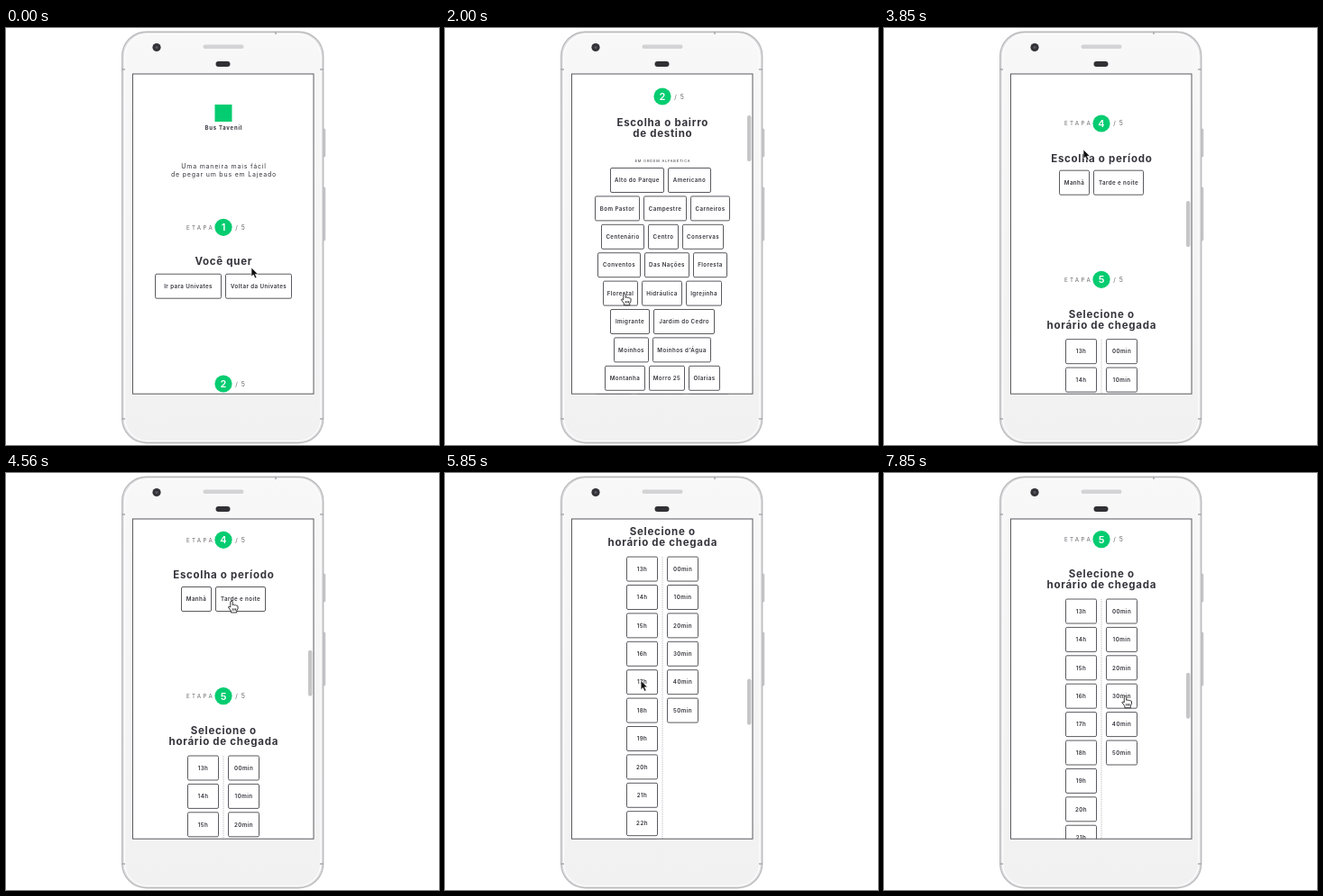
Animation, 480 px wide and 463 px high, one loop 8 s. Source, as an HTML page:

```html
<!DOCTYPE html>
<html lang="pt-BR">
<head>
<meta charset="utf-8">
<title>Ônibus em cinco etapas</title>
<style>
  html, body { margin: 0; width: 100%; height: 100%; overflow: hidden; background: #fff; }
  svg { display: block; width: 100%; height: 100%; }
  text { font-family: Inter, Roboto, sans-serif; text-anchor: middle; fill: #34343c; }
  .title { font-size: 11.5px; font-weight: 700; letter-spacing: .72px; }
  .button { font-size: 6.2px; font-weight: 600; letter-spacing: .42px; }
  .lead { font-size: 7px; letter-spacing: .8px; }
  .brand { font-size: 6px; font-weight: 700; letter-spacing: .75px; }
  .hint { font-size: 3.9px; letter-spacing: .85px; }
  .step { font-size: 6.2px; letter-spacing: 2.4px; fill: #66666c; }
  .total { font-size: 7px; letter-spacing: 1px; fill: #66666c; }
  .number { font-size: 11px; font-weight: 600; fill: #fff; }
  .result { font-size: 9.5px; font-weight: 600; letter-spacing: 1.6px; fill: #fff; }
  .box { fill: #fff; stroke: #5a5a60; stroke-width: 1; }
  .green { fill: #04cc70; }
</style>
</head>
<body>
<svg viewBox="0 0 480 463">
  <defs>
    <clipPath id="screen"><rect x="140.5" y="51.5" width="200.5" height="355"/></clipPath>
    <linearGradient id="shell" x2="0" y2="1">
      <stop stop-color="#f8f8f9"/><stop offset="1" stop-color="#f1f1f2"/>
    </linearGradient>
  </defs>

  <g fill="#c8c8cb" stroke="#aeaeb2" stroke-width=".5">
    <rect x="351" y="112" width="2.9" height="31" rx="1"/>
    <rect x="351" y="177" width="2.9" height="59" rx="1"/>
  </g>
  <rect x="128.7" y="4.2" width="223" height="456.5" rx="27" fill="#e2e2e4" stroke="#bcbcbf" stroke-width="1.4"/>
  <rect x="131.5" y="6.5" width="217.5" height="452" rx="25" fill="url(#shell)" stroke="#fff" stroke-width="1.2"/>
  <path d="M128 46h4M348 46h4M128 434h4M348 434h4M299 4v3" stroke="#aaaaae" stroke-width="1.6"/>
  <rect x="218.5" y="18.5" width="45" height="4.5" rx="2.2" fill="#d3d3d5"/>
  <circle cx="167" cy="21.5" r="4.6" fill="#333338"/>
  <circle cx="167" cy="21.5" r="1.6" fill="#56565e"/>
  <rect x="232.5" y="37" width="16" height="6" rx="3" fill="#303035"/>

  <rect x="140" y="51" width="201" height="355" fill="#fff"/>
  <g clip-path="url(#screen)">
    <g id="page"></g>
    <rect id="thumb" x="335" width="4.4" height="51" rx="2.2" fill="#c6c6c8"/>
  </g>
  <rect x="140.5" y="51" width="200.5" height="355.2" fill="none" stroke="#5b5b60"/>

  <path id="arrow" d="M0 0V10L2.3 8L4 11.8L5.9 11L4.2 7.3H7.3Z" fill="#111" stroke="#fff" stroke-width=".6"/>
  <path id="hand" d="M-1.2 1Q0-.6 1.2 1V4.8Q2.4 3.9 3.3 5Q4.5 4.2 5.3 5.4Q6.6 4.9 7 6.2V9L5.8 11V13.2H-.6V11.4L-3.6 7.2Q-3.4 5.6-1.2 7.2ZM1.2 8.6V11M3 8.6V11M4.7 8.6V11" fill="#fff" stroke="#222" stroke-width=".9" stroke-linejoin="round"/>
</svg>
<script>
const LOOP = 8000, FPS = 7, SCREEN_TOP = 51, PITCH = 31.4;
const $ = id => document.getElementById(id);
const page = $('page');

function add(tag, attrs, content = '') {
  const node = document.createElementNS('http://www.w3.org/2000/svg', tag);
  for (const name in attrs) node.setAttribute(name, attrs[name]);
  node.textContent = content;
  page.append(node);
}
const label = (style, x, y, content) => add('text', { class: style, x, y }, content);
const title = (y, ...lines) => lines.forEach((line, i) => label('title', 241.3, y + i * 12.2, line));

function step(n, y) {
  if (n !== 2) label('step', 215.5, y + 2.3, 'ETAPA');
  add('circle', { class: 'green', cx: 241, cy: y, r: 9.6 });
  label('number', 241, y + 4, n);
  label('total', 260, y + 2.5, '/ 5');
}

function button(x, y, width, content) {
  add('rect', { class: 'box', x: x + .5, y: y - 13.5, width: width - 1, height: 27, rx: 1.5 });
  label('button', x + width / 2, y + 2.2, content);
}

// Each row alternates label and width, laid out around a centre.
function row(y, items, centre = 241) {
  const gap = 4, pairs = [];
  for (let i = 0; i < items.length; i += 2) pairs.push([items[i], items[i + 1]]);
  const total = pairs.reduce((sum, [, w]) => sum + w + gap, -gap);
  let x = centre - total / 2;
  for (const [content, width] of pairs) {
    button(x, y, width, content);
    x += width + gap;
  }
}
const rows = (y, list) => list.forEach((items, i) => row(y + i * PITCH, items));

add('rect', { class: 'green', x: 231.5, y: 85, width: 19, height: 19 });
label('brand', 241.3, 113, 'Bus Tavenil');
label('lead', 241.5, 155.5, 'Uma maneira mais fácil');
label('lead', 241.5, 165.3, 'de pegar um bus em Lajeado');

step(1, 221.3);
title(263.3, 'Você quer');
row(286.7, ['Ir para Univates', 74, 'Voltar da Univates', 74]);

step(2, 395);
title(428.2, 'Escolha o bairro', 'de destino');
label('hint', 241.5, 468.3, 'EM ORDEM ALFABÉTICA');
row(488, ['Alto do Parque', 60, 'Americano', 48], 239);
rows(488 + PITCH, [
  ['Bom Pastor', 50, 'Campestre', 48, 'Carneiros', 44],
  ['Centenário', 48, 'Centro', 34, 'Conservas', 46],
  ['Conventos', 48, 'Das Nações', 50, 'Floresta', 38],
  ['Florestal', 39, 'Hidráulica', 45, 'Igrejinha', 40],
  ['Imigrante', 44, 'Jardim do Cedro', 68],
  ['Moinhos', 39, 'Moinhos d\'Água', 65],
  ['Montanha', 45, 'Morro 25', 40, 'Olarias', 35],
  ['Planalto', 41, 'Santo André', 54, 'São Bento', 46],
  ['São Cristóvão', 61, 'Universitário', 59]
]);

step(3, 878);
title(920, 'Escolha a parada');
rows(943, [
  ['Rodoviária', 46, 'Posto Verdália', 59],
  ['Banco Ondaleo', 57, 'Beer Tuk', 41, 'Suíça', 29]
]);

step(4, 1082.3);
title(1125, 'Escolha o período');
row(1148, ['Manhã', 34, 'Tarde e noite', 56]);

step(5, 1255.6);
title(1298, 'Selecione o', 'horário de chegada');
add('path', { d: 'M241 1322V1663', stroke: '#b9b9bd', 'stroke-width': 1, 'stroke-dasharray': '1 1' });
for (let i = 0; i < 11; i++) button(201, 1335.5 + i * PITCH, 35, `${13 + i}h`);
for (let i = 0; i < 6; i++) button(246, 1335.5 + i * PITCH, 35, `${i}0min`);

add('rect', { class: 'green', x: 140, y: 1748, width: 202, height: 700 });
label('result', 242, 1787.3, 'RESULTADO');

// Keys are [time, ...values].
const scrollKeys = [
  [850, 0], [1400, 319], [2030, 319], [2560, 804], [3446, 804], [4000, 1008],
  [4623, 1008], [5177, 1182], [5600, 1182], [6400, 1382.5], [6900, 1382.5], [7500, 1182]
];
const cursorKeys = [
  [0, 272, 266], [500, 277, 284], [1200, 277, 284], [1850, 199, 294.5], [2450, 199, 294.5],
  [2560, 200, 295], [3000, 207, 138], [3500, 210, 140], [3850, 221, 135], [4300, 250, 140],
  [4650, 250, 142], [5140, 235, 165], [5900, 217, 231], [7100, 217, 231], [7750, 267.5, 247.5]
];
const handSpans = [[350, 900], [1800, 2400], [2950, 3600], [4250, 4750], [5900, 6950], [7500, 8000]];

const swing = p => (1 - Math.cos(Math.PI * p)) / 2;

function sample(keys, t) {
  const next = keys.findIndex(key => key[0] > t);
  if (next === 0) return keys[0].slice(1);
  if (next < 0) return keys.at(-1).slice(1);
  const a = keys[next - 1], b = keys[next];
  const p = swing((t - a[0]) / (b[0] - a[0]));
  return a.slice(1).map((v, i) => v + (b[i + 1] - v) * p);
}

function draw(now) {
  const t = Math.floor(((now % LOOP) + 12) * FPS / 1000) * 1000 / FPS % LOOP;
  const [scroll] = sample(scrollKeys, t);
  const [x, y] = sample(cursorKeys, t);
  const isHand = handSpans.some(([from, to]) => t >= from && t < to);

  page.setAttribute('transform', `translate(0 ${-scroll})`);
  $('thumb').setAttribute('y', SCREEN_TOP + scroll * .1445);
  $('thumb').setAttribute('visibility', scroll > 0 ? 'visible' : 'hidden');
  for (const id of ['arrow', 'hand']) {
    $(id).setAttribute('transform', `translate(${x} ${y})`);
    $(id).setAttribute('visibility', (id === 'hand') === isHand ? 'visible' : 'hidden');
  }
}

function tick(now) {
  draw(now);
  requestAnimationFrame(tick);
}
draw(0);
requestAnimationFrame(tick);
</script>
</body>
</html>
```
